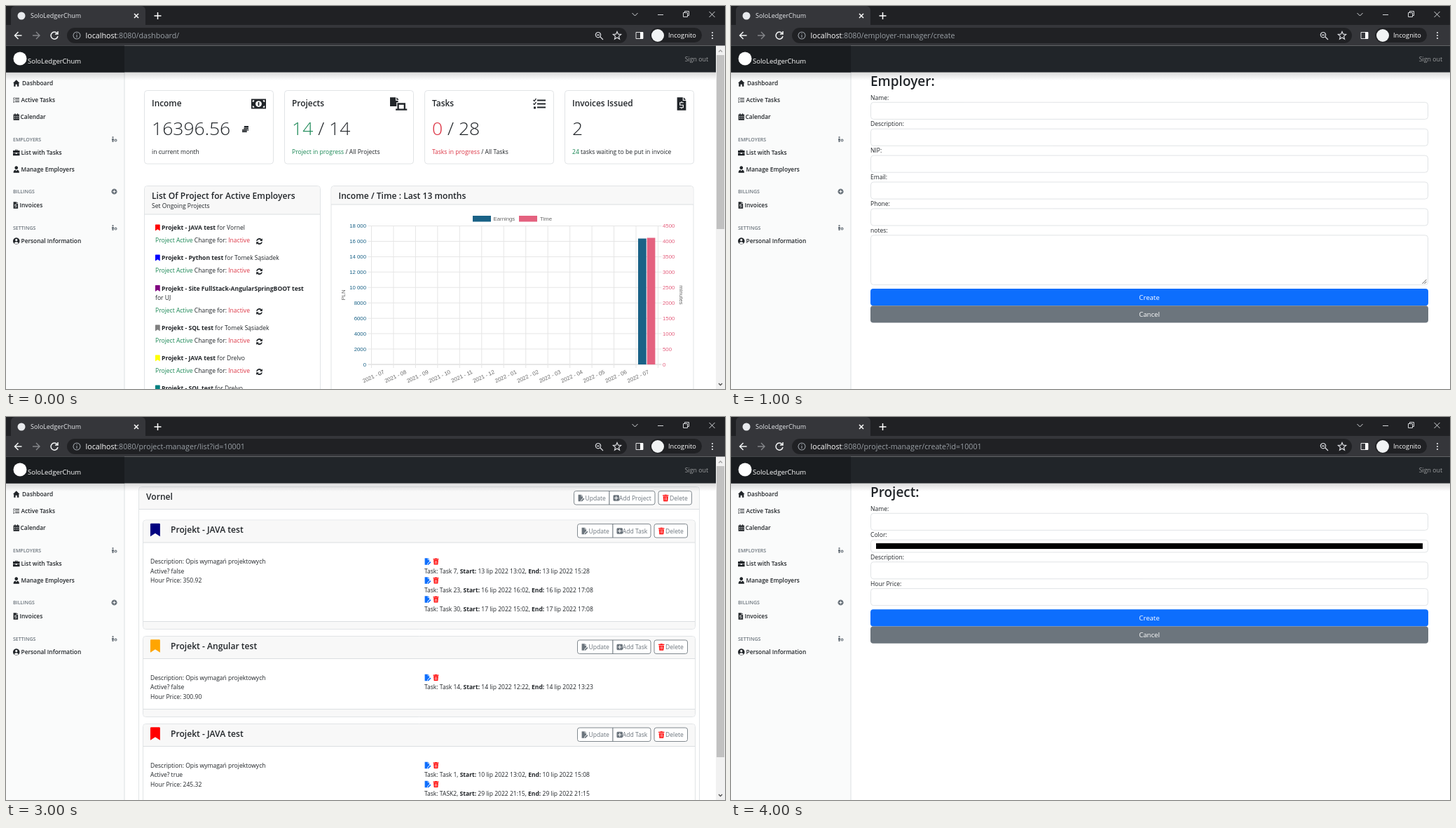
Write an HTML page with a canvas that moves like this. It is 1026 px wide and 546 px high and loops after 4.5 s.

```html
<!DOCTYPE html>
<html lang="en">
<head>
<meta charset="utf-8">
<title>SoloLedgerChum</title>
<style>
html, body { margin: 0; width: 100%; height: 100%; overflow: hidden; background: #fff; }
canvas { display: block; }
</style>
</head>
<body>
<canvas id="stage" width="1026" height="546"></canvas>
<script>
const c = document.getElementById('stage').getContext('2d');
const SANS = '"Open Sans", "Noto Sans", sans-serif', ARIAL = '"Liberation Sans", Arial, sans-serif';
const INK = '#212529', GRAY = '#6c757d', LINE = '#dcdfe2', RED = '#dc3545', GREEN = '#198754', BLUE = '#0d6efd';
const APP = 'SoloLedgerChum', CLIENT = 'Vornel', FRIEND = 'Tomek Sąsiadek', SHOP = 'Drelvo';
const BODY = 8.55, TITLE = 12.1;

// Icons on a 16-unit high grid, filled even-odd
const disc = 'M8 0a8 8 0 1 1-.01 0z';
const icons = {
  home: 'M8 0 0 8h2v8h4v-5h4v5h4V8h2z',
  checks: 'M6 2h12v2H6zM6 7h12v2H6zM6 12h12v2H6zM0 3l1-1 1 1 2-3 1 1-3 4zM0 8l1-1 1 1 2-3 1 1-3 4zM1 12h3v3H1z',
  calendar: 'M1 2h3V0h2v2h4V0h2v2h3v14H1zM3 6v2h2V6zM7 6v2h2V6zM11 6v2h2V6zM3 10v2h2v-2zM7 10v2h2v-2zM11 10v2h2v-2z',
  briefcase: 'M5 3V1h6v2h5v5H0V3zM6 2v1h4V2zM0 9h6v2h4V9h6v6H0z',
  user: 'M8 0a4 4 0 1 1-.01 0zM1 16q0-6 5-7l2 3 2-3q5 1 5 7z',
  invoice: 'M1 0h7v4h4v12H1zM9 0l3 3H9zM6 5h1v1h2v1H5v2h4v4H7v1H6v-1H4v-1h4v-2H4V6h2z',
  account: disc + 'M8 3a2.7 2.7 0 1 0 .01 0zM3 13q1-3 5-3t5 3q-5 4-10 0z',
  staff: 'M4 0a2.3 2.3 0 1 1-.01 0zM1 6h6v5H6v5H2v-5H1zM12 7a4 4 0 1 1-.01 0zM12 9.5a1.5 1.5 0 1 0 .01 0z',
  add: disc + 'M7 4v3H4v2h3v3h2V9h3V7H9V4z',
  money: 'M0 0h24v16H0zM12 3a5 5 0 1 0 .01 0zM2 2v3q3 0 3-3zM22 2h-3q0 3 3 3zM2 14h3q0-3-3-3zM22 14v-3q-3 0-3 3zM11 5h2v6h-2z',
  laptop: 'M0 0h7v4h3v2H8v5H0zM8 0l3 3H8zM9 7h10v7h2v2H7v-2h2zM11 9v5h6V9z',
  coins: 'M5 0h11v4H5zM4 5h12v3H4zM0 9h13v3H0zM0 13h12v3H0zM14 9h2v3h-2z',
  bookmark: 'M1 0h10q1 0 1 1v15l-6-4-6 4V1q0-1 1-1z',
  refresh: 'M1 7a7 7 0 0 1 12-4l2-2v6H9l2-2a5 5 0 0 0-8 2zM15 9a7 7 0 0 1-12 4l-2 2V9h6l-2 2a5 5 0 0 0 8-2z',
  edit: 'M1 0h7v4h4v4l-5 5v3H1zM9 0l3 3H9zM8 14l6-6 2 2-6 6H8z',
  trash: 'M1 1h4l1-1h4l1 1h4v2H1zM2 4h12l-1 12H3zM5 6v8h1V6zM7.5 6v8h1V6zM10 6v8h1V6z',
  info: disc + 'M7 3v2h2V3zM6 7v1h1v4H6v1h4v-1H9V7z',
  plus: 'M2 0h12l2 2v12l-2 2H2l-2-2V2zM7 3v4H3v2h4v4h2V9h4V7H9V3z'
};
for (const k in icons) icons[k] = new Path2D(icons[k]);

// y is the middle of the line; returns the x where the text ends
function text(s, x, y, size = BODY, color = INK, weight = 400, align = 'left', family = SANS) {
  c.font = `${weight} ${size}px ${family}`;
  c.fillStyle = color;
  c.textAlign = align;
  c.fillText(s, x, y + size * .36);
  return x + c.measureText(s).width;
}
function pair(bold, plain, x, y) {
  return text(plain, text(bold, x, y, BODY, INK, 700), y);
}
function rect(x, y, w, h, fill, stroke, radius = 0) {
  c.beginPath();
  c.roundRect(x, y, w, h, radius);
  if (fill) { c.fillStyle = fill; c.fill(); }
  if (stroke) { c.strokeStyle = stroke; c.lineWidth = .85; c.stroke(); }
}
function dot(x, y, r, color) { rect(x - r, y - r, 2 * r, 2 * r, color, null, r); }
function path(d, color, width = 1) {
  c.strokeStyle = color;
  c.lineWidth = width;
  c.stroke(new Path2D(d));
}
function icon(name, x, y, h, color = INK) {
  c.save();
  c.translate(x, y - h / 2);
  c.scale(h / 16, h / 16);
  c.fillStyle = color;
  c.fill(icons[name], 'evenodd');
  c.restore();
}
function turned(s, x, y, angle, color, align) {
  c.save();
  c.translate(x, y);
  c.rotate(angle);
  text(s, 0, 0, 7.8, color, 400, align, ARIAL);
  c.restore();
}

function browser(url) {
  rect(0, 0, 1026, 28, '#202124');
  rect(7, 0, 192, 29, '#35363a', null, [6, 6, 0, 0]);
  rect(0, 27, 1026, 29.5, '#35363a');
  dot(22, 14, 5.5, '#e8eaed');
  text(APP, 35, 14, 9, '#e8eaed');
  path('M183 11l6 6m0-6l-6 6M211.500 14h10m-5-5v10', '#fff', 1.5);
  path('M893.500 10l4 4 4-4M930 12.500h8M966.500 9.500h6v6h-6zM968.500 9v-1.500h6v6h-1.500M1003.500 8l8 8m0-8l-8 8', '#d5d7da');
  path('M22.500 42h-10m5-5l-5 5 5 5M73 39a5 5 0 1 0 1 4M74 36v4h-4', '#f1f3f4', 1.5);
  path('M38 42h10m-5-5l5 5-5 5', '#85878a', 1.4);
  rect(87, 31, 799, 22, '#202124', null, 11);
  path('M101 37a5 5 0 1 1-.01 0M101 41v4M101 38.500v1.200', '#9aa0a6', 1.1);
  const end = text('localhost', 113.5, 42, 10.7, '#fff');
  text(':8080/' + url, end, 42, 10.7, '#9aa0a6');
  path('M845 37.500a3.700 3.700 0 1 1-.01 0M848 44l4 4M843 41.300h4M872 36.500l1.600 3.700 4 .3-3.100 2.600 1 4-3.500-2.200-3.500 2.200 1-4-3.100-2.600 4-.3z', '#dadce0', 1.2);
  rect(899, 37.500, 10, 9, null, '#fff');
  rect(905, 37, 4, 10, '#fff');
  rect(919, 31, 74, 21, '#202124', null, 10.5);
  dot(930, 42, 9, '#f1f3f4');
  text('Incognito', 945, 42, 9.2, '#fff');
  [38, 42, 46].forEach(y => dot(1008, y, 1.1, '#e8eaed'));
}

function frame(url, thumbEnd) {
  const side = thumbEnd ? 169 : 171, right = thumbEnd ? 1013 : 1026;
  rect(0, 94, side, 452, '#fafbfb');
  rect(side - .5, 94, 1, 452, LINE);
  [['home', 'Dashboard', 23, 110], ['checks', 'Active Tasks', 21.5, 134], ['calendar', 'Calendar', 20.5, 158],
   ['briefcase', 'List with Tasks', 21.5, 209], ['user', 'Manage Employers', 21.5, 233],
   ['invoice', 'Invoices', 19.5, 284], ['account', 'Personal Information', 21.5, 335]].forEach(([name, s, x, y]) => {
    icon(name, 10, y, name == 'checks' ? 8 : 9.5);
    text(s, x, y, 8.35, INK, 600);
  });
  [['EMPLOYERS', 190, 'staff'], ['BILLINGS', 264.5, 'add'], ['SETTINGS', 316, 'staff']].forEach(([s, y, name]) => {
    text(s, 10, y, 7, GRAY, 600);
    icon(name, side - 18.500, y, 8, GRAY);
  });
  const shade = c.createLinearGradient(0, 94, 0, 106);
  shade.addColorStop(0, 'rgba(0,0,0,.15)');
  shade.addColorStop(1, 'rgba(0,0,0,0)');
  rect(0, 94, right, 12, shade);
  rect(0, 56.5, right, 38, '#212529');
  rect(0, 56.5, side, 38, '#191c1f');
  dot(20, 75, 9.5, '#fff');
  text(APP, 31, 78.5, 9.5, '#fff');
  text('Sign out', right - 11, 76, 8.75, '#9b9d9f', 400, 'right');
  if (thumbEnd) {
    rect(1013, 57, 13, 489, '#f1f1f1');
    rect(1014, 70, 11, thumbEnd - 70, '#c1c1c1');
    path('M1017 65.500l2.500-2.500 2.500 2.500', '#a3a3a3', 1.4);
    path('M1017 538l2.500 2.500 2.500-2.500', '#505050', 1.4);
  }
  browser(url);
}

function card(x, y, w, h, head) {
  rect(x, y, w, h, '#fff', LINE, 4);
  if (head) {
    rect(x + .5, y + .5, w - 1, head, '#f8f8f8', null, [4, 4, 0, 0]);
    rect(x, y + head, w, 1, LINE);
  }
}

function dashboard() {
  const stats = [
    ['Income', 'money', 350, 14, [['16396.56']], [['in current month']]],
    ['Projects', 'laptop', 548, 18.5, [['14', GREEN], [' / 14']], [['Project in progress', GREEN], [' / All Projects']]],
    ['Tasks', 'checks', 752, 16, [['0', RED], [' / 28']], [['Tasks in progress', RED], [' / All Tasks']]],
    ['Invoices Issued', 'invoice', 956.5, 18.5, [['2']], [['24', GREEN], [' tasks waiting to be put in invoice']]]
  ];
  stats.forEach(([title, name, ix, size, big, small], i) => {
    const x = 197.5 + i * 200;
    card(x, 120.5, 184, 104.5);
    text(title, x + 10.5, 139, TITLE - .2, INK, 600);
    icon(name, ix, 139.5, size);
    big.reduce((p, [s, col]) => text(s, p, 174.5, 26.5, col, 300), x + 10.5);
    small.reduce((p, [s, col]) => text(s, p, 208, BODY, col), x + 10.5);
  });
  icon('coins', 337, 175.5, 9);

  card(197.5, 256.5, 251, 300, 40);
  text('List Of Project for Active Employers', 208, 270.5, TITLE, INK, 600);
  text('Set Ongoing Projects', 208, 284.5);
  [['red', 'JAVA', CLIENT, 316], ['blue', 'Python', FRIEND, 359], ['purple', 'Site FullStack-AngularSpringBOOT', 'UJ', 402.5],
   ['gray', 'SQL', FRIEND, 459], ['yellow', 'JAVA', SHOP, 502], ['teal', 'SQL', SHOP, 545]].forEach(([color, name, owner, y]) => {
    icon('bookmark', 213, y, 9, color);
    const end = text(`Projekt - ${name} test`, 222, y, 8.6, INK, 700);
    if (end > 400) text('for ' + owner, 213, y += 13.5);
    else text(' for ' + owner, end, y);
    y += 18;
    let x = text('Project Active', 213, y, BODY, GREEN);
    x = text(' Change for: ', x, y);
    text('Inactive', x, y, BODY, RED);
    icon('refresh', 356.5, y + 1.5, 10);
  });
  chart();
}

function chart() {
  const L = 521.5, R = 930.5, top = 313.5, bottom = 511, teal = '#1a6287', pink = '#e4617f';
  const step = (R - L) / 13, row = (bottom - top) / 9;
  const label = (s, x, y, color, align) => text(s, x, y, 7.8, color, 400, align, ARIAL);
  card(464, 256.5, 517, 300, 26);
  text('Income / Time : Last 13 months', 474.5, 270.5, TITLE, INK, 600);
  rect(666, 299, 26, 8.5, teal);
  label('Earnings', 695.5, 303, '#666');
  rect(732, 299, 26, 8.5, pink);
  label('Time', 762, 303, '#666');
  for (let i = 0; i < 10; i++) {
    const y = bottom - i * row, v = i * 2000;
    rect(L - 5, y - .5, R - L + 10, 1, i ? '#e6e6e6' : '#cfcfcf');
    label(v < 10000 ? v : v / 1000 + ' 000', 514, y, teal, 'right');
    label(i * 500, 937, y, pink);
  }
  for (let i = 0; i < 14; i++) {
    const x = L + i * step, m = i + 6;
    rect(x - .5, top, 1, bottom - top + 5, '#e6e6e6');
    if (i < 13) turned(`${2021 + (m / 12 | 0)} - ${String(m % 12 + 1).padStart(2, 0)}`, x + step / 2 + 2, 521, -.43, '#666', 'right');
  }
  rect(902, 331.5, 11.700, bottom - 331.500, teal);
  rect(914.700, 330.500, 11.700, bottom - 330.500, pink);
  turned('PLN', 481, 412, -Math.PI / 2, '#666', 'center');
  turned('minutes', 964, 412, Math.PI / 2, '#666', 'center');
}

function form(title, fields) {
  text(title, 199, 107.5, 19, INK, 600);
  let y = 130.5;
  fields.forEach(([name, h = 24.1]) => {
    text(name + ':', 199, y);
    rect(199.5, y + 6.8, 795, h, '#fff', LINE, 4);
    if (name == 'Color') rect(207, y + 11.5, 780, 8, '#000');
    y += h + 13.8;
    if (name == 'notes') path(`M986.500 ${y - 8.500}l6-6m-3 6l3-3`, '#555');
  });
  y -= 1.4;
  [['Create', BLUE], ['Cancel', GRAY]].forEach(([s, color], i) => {
    rect(199, y + i * 24.2, 796, 24.2, color, null, 4);
    text(s, 597, y + i * 24.2 + 12.3, 9.6, '#fff', 400, 'center');
  });
}

function button(x, y, w, name, s, radius, hover) {
  const color = hover ? '#fff' : GRAY;
  const wide = name == 'edit' || name == 'trash';
  rect(x, y, w, 19.5, hover ? GRAY : '#fff', GRAY, radius);
  icon(name, x + 5.5, y + 10, wide ? 9.5 : 8.5, name == 'trash' && s ? 'red' : color);
  text(s, x + (wide ? 16 : 13.7), y + 10, 8.6, color);
}
function buttons(x, y, w1, w2, name, s, hover) {
  button(x, y, w1, 'edit', 'Update', [3, 0, 0, 3]);
  button(x + w1, y, w2, name, s, [0, 3, 3, 0], hover);
  button(x + w1 + w2 + 5, y, 47.5, 'trash', 'Delete', 3);
}

const employers = [
  { name: CLIENT, nip: '5300000087', mail: '908@kk.test', count: 3, places: [
    ['Główny', 'Zmyślakowa 38/17', '99-027 Brzólin, Polska'], ['Firmowy', 'Mglistawa 52/18', '99-027 Mierzgosz, Polska']] },
  { name: FRIEND, nip: '5300000094', mail: '671@mm.test', count: 5, places: [
    ['Firmowy', 'Klepkowa 37/4', '99-027 Olbrzów, Polska'], ['Firmowy', 'Drozdylowicza 62/8', '99-027 Modrzawa, Polska']] },
  { name: 'UJ', places: [] }
];
function employerList(hover) {
  employers.forEach((e, i) => {
    const y = 99.5 + i * 208.1;
    card(197.5, y, 784, 202.5, 31.5);
    text(e.name, 208, y + 14, TITLE, INK, 600);
    buttons(765.5, y + 6, 51, 102, 'info', 'Detailed Information', hover && !i);
    if (!e.nip) return;
    text('Address:', 208, y + 59.5);
    icon('plus', 244, y + 59.5, 8, BLUE);
    rect(459, y + 52, 1, 139, '#f1f2f3');
    e.places.forEach(([kind, street, town], j) => {
      const py = y + 89 + j * 53;
      text(kind, 208, py, TITLE, INK, 700);
      text(street, 208, py + 19.5);
      text(town, 208, py + 33);
      button(411.5, py - 10, 21, 'edit', '', [3, 0, 0, 3]);
      button(432.5, py - 10, 19, 'trash', '', [0, 3, 3, 0]);
    });
    [['NIP: ', e.nip], ['E-mail: ', e.mail], ['Description: ', '?'], ['Notes: ', '?']].forEach(([k, v], j) =>
      pair(k, v, 468, y + 62 + j * 18.7));
    text('Project count:', 727, y + 63.5, TITLE, INK, 700);
    text(e.count, 820, y + 63.5, TITLE);
    text('Active Employer with pendig Projects:', 727, y + 89.5, TITLE, INK, 700);
    text('true', 727, y + 105, TITLE);
  });
}

// Tasks: name, day, start, end
const first = ['Task 1', 10, '13:02', '15:08'], second = ['TASK2', 29, '21:15', '21:15'];
const navy = { color: 'navy', name: 'JAVA', price: '350.92', tasks: [
  ['Task 7', 13, '13:02', '15:28'], ['Task 23', 16, '16:02', '17:08'], ['Task 30', 17, '15:02', '17:08']] };
const orange = { color: 'orange', name: 'Angular', price: '300.90', tasks: [['Task 14', 14, '12:22', '13:23']] };
const red = { color: 'red', name: 'JAVA', price: '245.32', tasks: [first] };

function projectList(projects, isActive, hover) {
  card(189.5, 99.5, 800, 460, 31.5);
  text(CLIENT, 200, 113.5, TITLE, INK, 600);
  buttons(810.5, 105.5, 50.5, 65, 'plus', 'Add Project', hover);
  let y = 147;
  projects.forEach(p => {
    const h = 74.5 + Math.max(40.5, 27 * p.tasks.length);
    card(195.5, y, 788, h, 31.5);
    rect(196, y + h - 11.5, 787, 11, '#f8f8f8', null, [0, 0, 4, 4]);
    rect(196, y + h - 11.5, 787, 1, LINE);
    icon('bookmark', 206, y + 14, 18.5, p.color);
    text(`Projekt - ${p.name} test`, 235, y + 14, TITLE, INK, 600);
    buttons(815.5, y + 5.5, 50.5, 54, 'plus', 'Add Task');
    ['Description: Opis wymagań projektowych', 'Active? ' + isActive(p), 'Hour Price: ' + p.price].forEach((s, i) =>
      text(s, 206, y + 59 + i * 13.6));
    p.tasks.forEach(([name, day, start, end], i) => {
      const ty = y + 59 + i * 27;
      icon('edit', 597, ty, 9.5, BLUE);
      icon('trash', 609, ty, 9, 'red');
      const x = text(`Task: ${name}, `, 597, ty + 13.5);
      pair('End: ', `${day} lip 2022 ${end}`, pair('Start: ', `${day} lip 2022 ${start}, `, x, ty + 13.5), ty + 13.5);
    });
    y += h + 10;
  });
}

const projectsUrl = 'project-manager/list?id=10001';
const scenes = [
  [0, dashboard, 'dashboard/', 318],
  [1000, () => form('Employer:', [['Name'], ['Description'], ['NIP'], ['Email'], ['Phone'], ['notes', 70.6]]), 'employer-manager/create'],
  [2000, () => employerList(false), 'employer-manager/list', 330],
  [2500, () => employerList(true), 'employer-manager/list', 330],
  [3000, () => projectList([navy, orange, { ...red, tasks: [first, second] }], p => p.color == 'red', false), projectsUrl, 485],
  [3500, () => projectList([red, navy, orange], () => true, true), projectsUrl, 518],
  [4000, () => form('Project:', [['Name'], ['Color', 17.7], ['Description'], ['Hour Price']]), 'project-manager/create?id=10001']
];

function draw() {
  const t = performance.now() % 4500;
  const [, content, url, thumbEnd] = scenes.filter(s => s[0] <= t).pop();
  rect(0, 0, 1026, 546, '#fff');
  content();
  frame(url, thumbEnd);
  requestAnimationFrame(draw);
}
draw();
</script>
</body>
</html>
```
